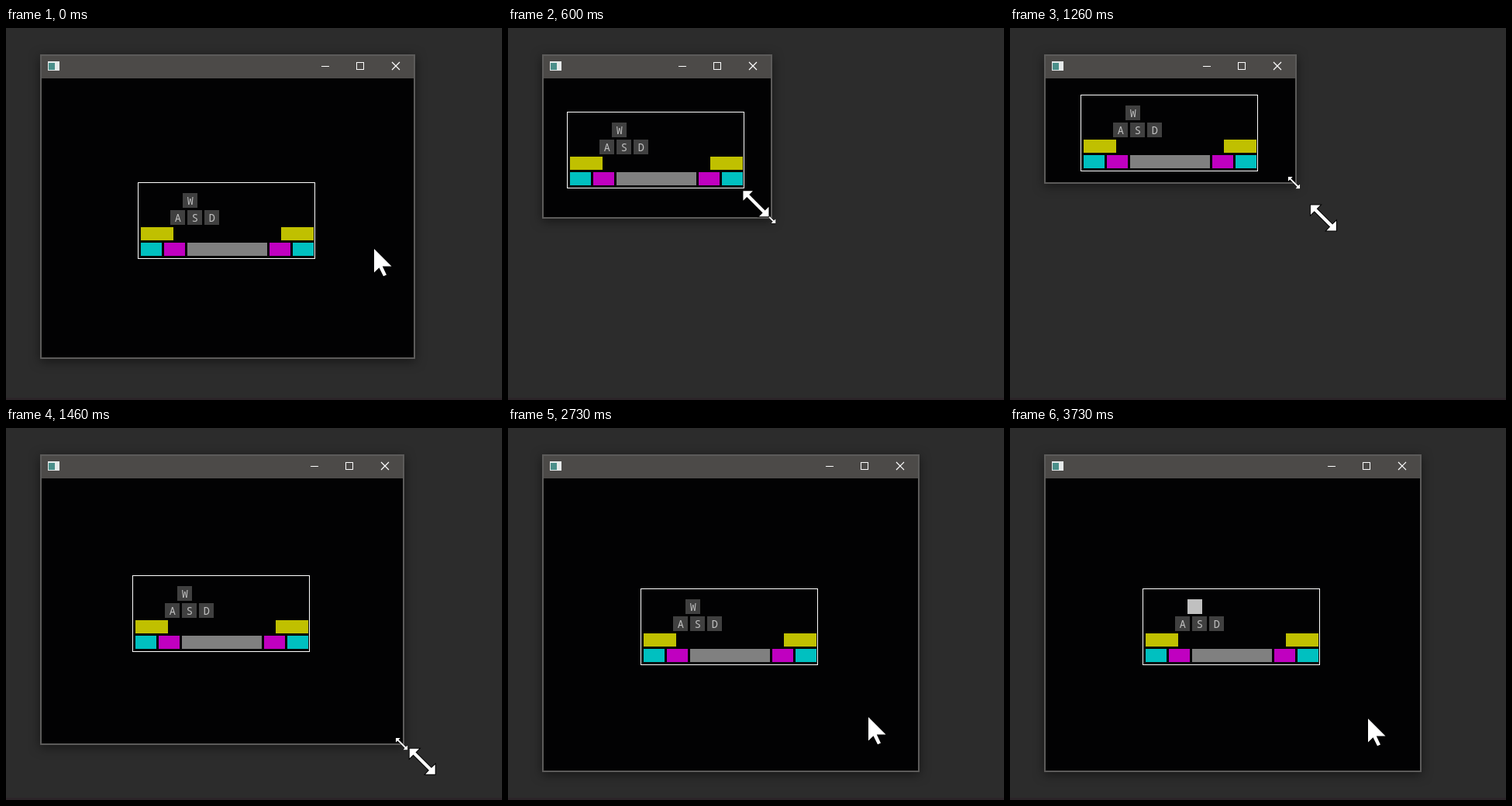
These frames come from a looping animation (640 px wide and 480 px high, 3800 ms). An HTML page:

```html
<!DOCTYPE html>
<html lang="en">
<head>
<meta charset="utf-8">
<title>Window resize and key test</title>
<style>
  html, body { margin: 0; width: 100%; height: 100%; overflow: hidden; background: #2c2c2c; }
  #stage { display: block; width: 100vw; height: 100vh; }
  #shadow { filter: drop-shadow(0 3px 7px rgba(0, 0, 0, .5)); }
  text { font: 500 13.5px "Noto Sans Mono", "DejaVu Sans Mono", monospace; fill: #c0c0c0; text-anchor: middle; }
  use { fill: #fff; stroke: #000; paint-order: stroke; }
</style>
</head>
<body>
<svg id="stage" viewBox="0 0 640 480">
  <defs>
    <path id="arrow" d="M0 0V30.5L6.5 24.2L12 35.2L16 33.4L10.8 22.6H22.5Z"/>
    <path id="sizer" d="M-16.5-16.5H-4L-8.7-11.7L11.7 8.7L16.5 4V16.5H4L8.7 11.7L-11.7-8.7L-16.5-4Z"/>
  </defs>
  <rect width="640" height="480" fill="#2c2c2c"/>
  <rect y="477" width="640" height="3" fill="#2c2529"/>
  <rect id="shadow" x="44" y="34" fill="#5c5b5a"/>
  <rect id="title" x="46" y="36" height="29" fill="#4c4a48"/>
  <g id="buttons" fill="none" stroke="#fff">
    <path d="M-121 49.5h10"/>
    <rect x="-75.5" y="44.5" width="9" height="9"/>
    <path d="M-30 44l10 10m0-10l-10 10" stroke-width="1.2"/>
  </g>
  <rect x="54" y="43" width="15" height="12" fill="#e6eaea"/>
  <rect x="55" y="45" width="8" height="9" fill="#4b8f8a"/>
  <svg id="client" x="46" y="65" overflow="hidden">
    <rect width="640" height="480" fill="#020203"/>
    <g id="panel"><rect x=".5" y=".5" width="228" height="98" fill="none" stroke="#fff"/></g>
  </svg>
  <use id="small" href="#sizer" stroke-width="2"/>
  <use id="big" href="#sizer" stroke-width="2"/>
  <use id="pointer" href="#arrow"/>
</svg>
<script>
const LOOP = 3800, STEP = 20 / 3;
const $ = id => document.getElementById(id);
const set = (el, attrs) => { for (const k in attrs) el.setAttribute(k, attrs[k]); };
const add = (tag, attrs) => {
  const el = document.createElementNS("http://www.w3.org/2000/svg", tag);
  set(el, attrs);
  return $("panel").appendChild(el);
};

const keys = [];
const block = (x, y, width, height) => add("rect", { x, y, width, height });

// "from" and "to" are the ticks of press and release.
function letter(label, x, y, from, to) {
  const parts = [block(x, y, 19, 19)];
  add("text", { x: x + 9.8, y: y + 15 }).textContent = label;
  keys.push({ idle: "#404040", down: "#c0c0c0", from, to, parts });
}

// A bar key and its mirror image on the other side of the panel.
function bars(x, y, width, idle, down, from, to) {
  const parts = [x, 231 - x - width].map(left => block(left, y, width, 17));
  keys.push({ idle, down, from, to, parts });
}

letter("W", 58, 14, 54, 57);
[..."ASD"].forEach((c, i) => letter(c, 42 + 22 * i, 36, 46 + 2 * i, 48 + 2 * i));
bars(34, 78, 27, "#c000c0", "#ff8080", 30, 32);
bars(4, 78, 27, "#00c0c0", "#80ffff", 32, 35);
bars(4, 58, 42, "#c0c000", "#ffff80", 35, 37);
bars(64, 78, 103, "#808080", "#ffffff", 38, 41);

// Eased move between two points; "bend" makes y run ahead of x (< 1) or behind it (> 1).
function glide(n, start, end, [x0, y0], [x1, y1], bend = 1) {
  const u = Math.min(1, Math.max(0, (n - start) / (end - start)));
  const s = u * u * (3 - 2 * u);
  return [x0 + (x1 - x0) * s, y0 + (y1 - y0) * s ** bend];
}

const HOME = [475, 285], GRIP = [525.5, 426.5], NEAR = [123.5, 99.5];
const FAR = [545, 443.5], REST = [465, 373], END = [462, 375];

function cursor(n) {
  if (n < 4) return glide(n, 0, 3, HOME, GRIP);
  if (n < 6) return GRIP;
  if (n < 13) return glide(n, 4.98, 12.9, GRIP, NEAR, 0.735);
  if (n < 23) return glide(n, 13, 22.79, NEAR, FAR, 2.122);
  if (n < 27) return glide(n, 23, 26, FAR, REST);
  return glide(n, 48, 52, REST, END);
}

// The dragged corner trails the cursor.
function corner(n) {
  const near = [122.5, 111.6], turn = 13.46;
  return n < turn
    ? glide(n, 4.942, turn, [524.5, 425.9], near, 0.717)
    : glide(n, turn, 23.2, near, [527.5, 442.5], 2.614);
}

function place(id, visible, [x, y], scale = 1) {
  set($(id), {
    visibility: visible ? "visible" : "hidden",
    transform: `translate(${x} ${y}) scale(${scale})`
  });
}

function layout(right, bottom) {
  const w = right - 48, h = bottom - 67;
  set($("shadow"), { width: right - 44, height: bottom - 34 });
  set($("title"), { width: w });
  set($("buttons"), { transform: `translate(${right} 0)` });
  set($("client"), { width: w, height: h });
  set($("panel"), {
    transform: `translate(${Math.floor((w - 232) / 2)} ${Math.floor((h - 92) / 2)})`
  });
}

function draw(ms) {
  // The picture advances at 15 ticks per second, on 10 ms boundaries.
  const n = Math.ceil((Math.floor(ms / 10) + 1) / STEP) - 1;
  const [cx, cy] = corner(n);
  layout(Math.max(168, Math.round(cx + 3.5)), Math.round(cy + 1.5));

  const sizing = n >= 3 && n < 24;
  place("big", sizing, cursor(n));
  place("pointer", !sizing, cursor(n));
  place("small", n > 5 && n < 24, [cx, cy], 0.46);

  for (const k of keys) {
    const fill = n >= k.from && n < k.to ? k.down : k.idle;
    k.parts.forEach(p => set(p, { fill }));
  }
}

const start = performance.now();
function tick() {
  draw((performance.now() - start) % LOOP);
  requestAnimationFrame(tick);
}
tick();
</script>
</body>
</html>
```
